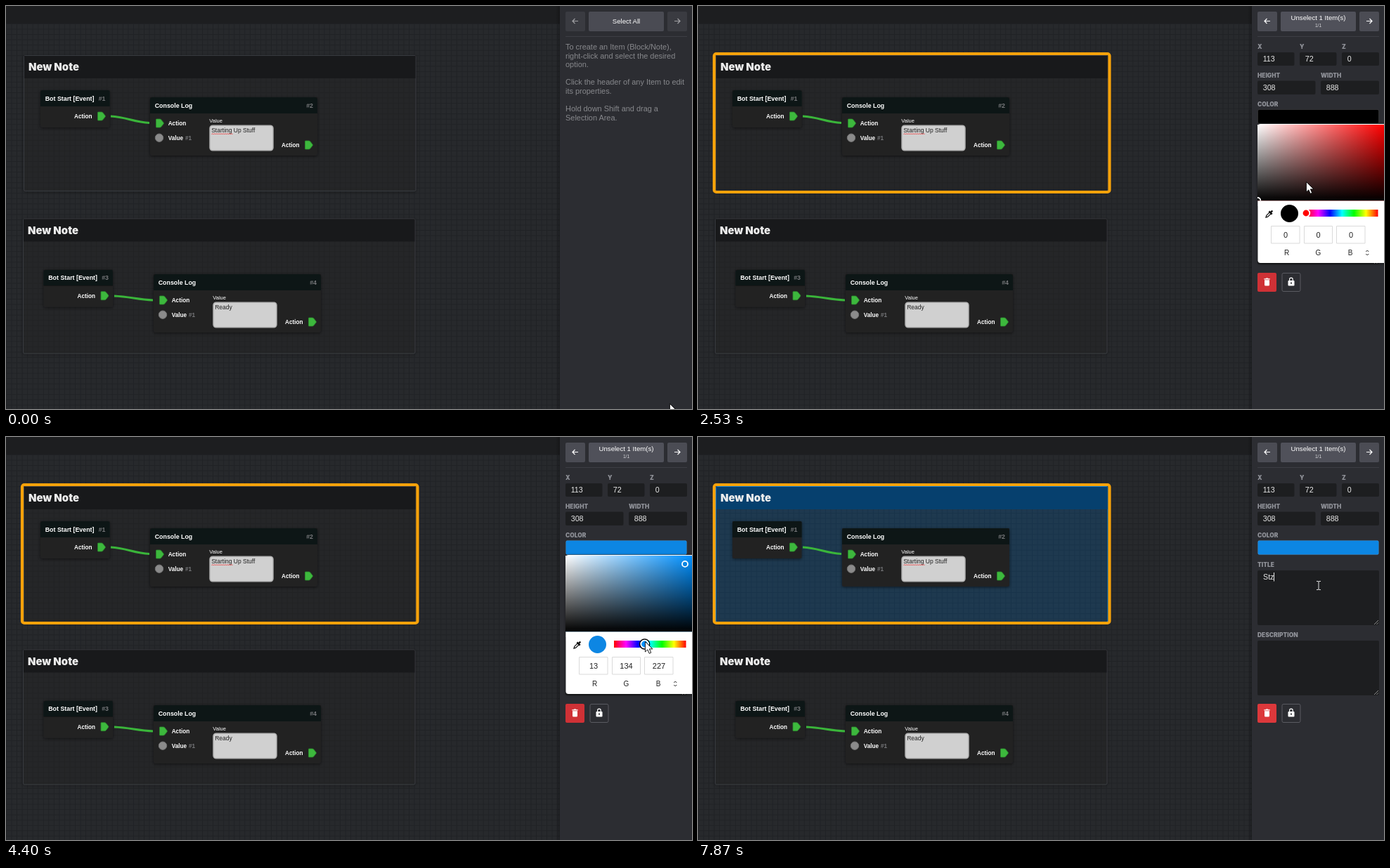
Write an HTML page that moves like this. It is 976 px wide and 574 px high and loops after 8 s.

```html
<!DOCTYPE html>
<html lang="en">
<head>
<meta charset="utf-8">
<title>Node editor</title>
<style>
  html, body { margin: 0; width: 100%; height: 100%; overflow: hidden; background: #26282b; }
  svg { display: block; width: 976px; height: 574px; }
  text { font-family: "Liberation Sans", Arial, sans-serif; fill: #fff; white-space: pre; }
  .head { font: 900 14.9px Inter, sans-serif; fill: #ececec; }
  .label { font: 900 8.4px Inter, sans-serif; fill: #8f9198; }
  .name { font-size: 8.85px; font-weight: bold; }
  .port { font-size: 8.2px; font-weight: bold; }
  .dim { fill: #77787b; }
  .tiny { font-size: 7.5px; }
  .value { font-size: 8.5px; fill: #222; }
  .button { font-size: 9.6px; text-anchor: middle; }
  .help text { font-size: 10.95px; fill: #87888c; }
  .input { font-size: 10.7px; fill: #e8e8e8; }
  .rgb text { font-size: 11px; fill: #222; text-anchor: middle; }
  .end { text-anchor: end; }
  .field { fill: #1d1e20; }
  .icon { fill: none; stroke: #fff; stroke-width: 1.2; }
</style>
</head>
<body>
<svg viewBox="0 0 976 574">
  <defs>
    <pattern id="grid" width="7.54" height="7.54" patternUnits="userSpaceOnUse" y="25">
      <path d="M0 .5H7.54M.5 0V7.54" stroke="#202225" fill="none"/>
    </pattern>
    <linearGradient id="toWhite"><stop stop-color="#fff"/><stop offset="1" stop-color="#fff" stop-opacity="0"/></linearGradient>
    <linearGradient id="toBlack" x2="0" y2="1"><stop stop-opacity="0"/><stop offset="1"/></linearGradient>
    <linearGradient id="edge"><stop stop-opacity="0"/><stop offset="1" stop-opacity=".25"/></linearGradient>
    <linearGradient id="hues">
      <stop stop-color="#f00"/><stop offset=".167" stop-color="#f0f"/><stop offset=".333" stop-color="#00f"/>
      <stop offset=".5" stop-color="#0ff"/><stop offset=".667" stop-color="#0f0"/>
      <stop offset=".833" stop-color="#ff0"/><stop offset="1" stop-color="#f00"/>
    </linearGradient>
    <filter id="shadow" x="-20%" y="-20%" width="140%" height="150%">
      <feDropShadow dx="0" dy="1" stdDeviation="2" flood-opacity=".55"/>
    </filter>
    <clipPath id="shadeClip"><rect x="796" y="169" width="180" height="108.5"/></clipPath>
    <path id="plug" d="M.5-5.2Q.5-6 1.3-6H5.6Q7-6 8-4.8L11-1Q11.7 0 11 1L8 4.8Q7 6 5.6 6H1.3Q.5 6 .5 5.2Z" fill="#3db83d" stroke="#2d8a2e" stroke-width=".8"/>
    <path id="grip" d="M0 6L6 0M3.4 6L6 3.4" stroke="#8a8a8a" fill="none"/>
    <g id="arrow"><path d="M.4.5V15L3.8 11.9 6.2 17.3 8.7 16.2 6.4 10.9H11Z" fill="#fff" stroke="#000" stroke-width=".9"/></g>
    <path id="move" d="M0-8L3-4.8H1V-1H4.8V-3L8 0 4.8 3V1H1V4.8H3L0 8-3 4.8H-1V1H-4.8V3L-8 0-4.8-3V-1H-1V-4.8H-3Z" fill="#fff" stroke="#000" stroke-width=".7"/>
    <path id="beam" d="M-3-6H-1Q0-6 0-5 0-6 1-6H3M0-5V5M-3 6H-1Q0 6 0 5 0 6 1 6H3" fill="none" stroke="#ddd"/>
  </defs>

  <rect width="976" height="574" fill="#27292c"/>
  <rect width="788" height="574" fill="url(#grid)"/>
  <rect width="788" height="25" fill="#1d1e20"/>
  <g id="canvas"></g>

  <rect x="782" width="6" height="574" fill="url(#edge)"/>
  <rect x="788" width="188" height="574" fill="#2c2d32"/>
  <g id="nav">
    <rect x="796" y="8" width="28" height="28" rx="2"/>
    <rect x="941" y="8" width="28" height="28" rx="2"/>
    <path d="M814 21.5H806M809.5 18L806 21.5 809.5 25M951 21.5H959M955.5 18L959 21.5 955.5 25" fill="none" stroke-width="1.2"/>
  </g>
  <rect id="main" x="829" y="8" width="107" height="28" rx="2"/>
  <path d="M796 43.5H969" stroke="#3d3e44"/>

  <g id="idle" class="help">
    <text class="button" x="882.5" y="25" style="fill:#fff;font-size:9.6px">Select All</text>
    <text x="796" y="62">To create an Item (Block/Note),</text>
    <text x="796" y="74.6">right-click and select the desired</text>
    <text x="796" y="87.2">option.</text>
    <text x="796" y="112.3">Click the header of any Item to edit</text>
    <text x="796" y="124.9">its properties.</text>
    <text x="796" y="150">Hold down Shift and drag a</text>
    <text x="796" y="162.6">Selection Area.</text>
  </g>

  <g id="form">
    <text class="button" x="882.5" y="20.3">Unselect 1 Item(s)</text>
    <text class="button" x="882.5" y="30" style="font-size:6.6px;fill:#d5d5d8">1/1</text>
    <g id="fields"></g>
    <rect id="swatch" x="796.5" y="147.5" width="172" height="20" rx="2" stroke="#fff" stroke-opacity=".13"/>
    <rect id="mark" x="804" y="193" width="47" height="12" fill="#0a74d4"/>
    <text id="title" class="input" x="804" y="203"></text>
    <path id="caret" d="M.5 193V205.500" stroke="#e8e8e8"/>
    <rect id="trash" x="796" y="380" width="27" height="27" rx="2"/>
    <path d="M805.300 389.500H813.700V388.300H811.500L810.800 387.500H808.200L807.500 388.300H805.300ZM806 390.300H813V397.200Q813 398.500 811.700 398.500H807.300Q806 398.500 806 397.200Z" fill="#fff"/>
    <rect x="831" y="380.500" width="26" height="26" rx="2" fill="none" stroke="#5a5b61"/>
    <path d="M841.600 391V389.500A2.300 2.300 0 0 1 846.200 389.500V391" class="icon"/>
    <rect x="839.500" y="391" width="9" height="7.500" rx="1" fill="#fff"/>
    <circle cx="844" cy="394.700" r="1.100" fill="#2c2d32"/>
  </g>

  <g id="picker" class="rgb">
    <rect x="796.500" y="168" width="190" height="198" rx="4" fill="#fff" filter="url(#shadow)"/>
    <g clip-path="url(#shadeClip)">
      <rect id="shade" x="796" y="169" width="180.300" height="108.500"/>
      <rect x="796" y="169" width="180.300" height="108.500" fill="url(#toWhite)"/>
      <rect x="796" y="169" width="180.300" height="108.500" fill="url(#toBlack)"/>
      <g id="shadeKnob" fill="none"><circle r="5.500" stroke="#000" stroke-width="2"/><circle r="4" stroke="#fff" stroke-width="1.800"/></g>
    </g>
    <path d="M808 301L808.800 298.300 813.600 293.500 815.500 295.400 810.700 300.200Z" fill="none" stroke="#111" stroke-width="1.200"/>
    <path d="M812.400 292.300L816.700 296.600M814 294.800L817.300 291.500" stroke="#111" stroke-width="2.400"/>
    <circle id="dot" cx="841.500" cy="295.500" r="12.500"/>
    <rect x="865" y="290" width="102.500" height="10" fill="url(#hues)"/>
    <g id="hueKnob"><circle r="7" stroke="#000" stroke-width="1.600" fill="none"/><circle id="hueFill" r="5.300" stroke="#fff" stroke-width="1.800"/></g>
    <path d="M815.500 313.500h40.500v24.500h-40.500ZM862.500 313.500H902.500V338H862.500ZM908.500 313.500H949V338H908.500Z" fill="none" stroke="#dadada"/>
    <text id="r" x="836" y="330"></text><text id="g" x="882.500" y="330"></text><text id="b" x="929" y="330"></text>
    <text x="837.500" y="355" style="font-size:10px">R</text><text x="882.500" y="355" style="font-size:10px">G</text><text x="928" y="355" style="font-size:10px">B</text>
    <path d="M950.300 350L952.300 348 954.300 350M950.300 353L952.300 355 954.300 353" fill="none" stroke="#222"/>
  </g>
  <use id="cursor"/>
</svg>

<script>
const $ = id => document.getElementById(id);
const show = (id, on) => $(id).style.display = on ? "" : "none";
const at = (id, x, y) => $(id).setAttribute("transform", `translate(${x} ${y})`);
const fill = (id, color) => $(id).setAttribute("fill", color);

// Static scene
const note = (x, y, w, h, id) => `<g transform="translate(${x} ${y})">
  <rect id="${id}Body" x=".5" y=".5" width="${w}" height="${h}" rx="2" fill="#2a2c2f" fill-opacity=".35" stroke="#393b3f" filter="url(#shadow)"/>
  <rect id="${id}Head" x="1" y="1" width="${w - 1}" height="32" fill="#18191b"/>
  <text class="head" x="7" y="22">New Note</text></g>`;

const box = (w, h, name, id) => `<g filter="url(#shadow)"><rect width="${w}" height="${h}" rx="2" fill="#212224"/>
  <path d="M0 23V2Q0 0 2 0H${w - 2}Q${w} 0 ${w} 2V23Z" fill="#111214"/></g>
  <text class="name" x="6.700" y="14.700">${name}</text>
  <text class="name dim end" x="${w - 6}" y="14.700" font-weight="400">#${id}</text>`;

const plug = (x, y) => `<use href="#plug" x="${x}" y="${y}"/>`;

const startBlock = (x, y, id) => `<g transform="translate(${x} ${y})">${box(98.5, 53, "Bot Start [Event]", id)}
  <text class="port end" x="73.500" y="40">Action</text>${plug(81, 37)}</g>`;

const logBlock = (x, y, id, value, extra = "") => `<g transform="translate(${x} ${y})">${box(238, 83, "Console Log", id)}
  ${plug(8, 37)}<text class="port" x="25.700" y="40">Action</text>
  <circle cx="13" cy="57.700" r="5.700" fill="#8b8b8b" stroke="#747474"/>
  <text class="port" x="25.700" y="60.800">Value</text><text class="port dim" x="50" y="60.800">#1</text>
  <text class="tiny" x="84.300" y="35.700">Value</text>
  <rect x="85" y="40.200" width="90" height="35.600" rx="4" fill="#d0d0d0" stroke="#b0b0b0" stroke-width="1.500"/>
  <text class="value" x="87.200" y="50.300">${value}</text>${extra}
  <text class="port end" x="212.500" y="71.400">Action</text>${plug(220, 68)}</g>`;

const wire = (x, y, dy) => `<path d="M${x} ${y}c22 1 33 ${dy - 1} 55 ${dy}" fill="none" stroke="#3ab53a" stroke-width="3"/>`;
const squiggle = `<path d="M87.500 53${"l1.500-1.500 1.500 1.500".repeat(10)}" fill="none" stroke="#e33" stroke-width=".8"/>`;

$("canvas").innerHTML =
  note(25, 70, 557.5, 193, "first") +
  `<rect id="outline" x="23" y="68" width="562.500" height="197" rx="3" fill="none" stroke="#f7a20a" stroke-width="4.200"/>` +
  note(24, 302.5, 557.5, 192, "second") +
  startBlock(49, 120, 1) + logBlock(205, 130, 2, "Starting Up Stuff", squiggle) + wire(149, 157, 9.500) +
  startBlock(53.5, 375.7, 3) + logBlock(210, 382, 4, "Ready") + wire(154, 413, 6);

const field = (label, x, y, w, h, value = "") => `<text class="label" x="${x}" y="${y - 5}">${label}</text>
  <rect class="field" x="${x}" y="${y}" width="${w}" height="${h}" rx="2"/>
  <text class="input" x="${x + 7.7}" y="${y + 13}">${value}</text>
  ${h > 50 ? `<use href="#grip" x="${x + w - 7}" y="${y + h - 7}"/>` : ""}`;

$("fields").innerHTML =
  field("X", 796, 66, 52.5, 19, "113") + field("Y", 856, 66, 52.5, 19, "72") + field("Z", 916, 66, 53, 19, "0") +
  field("HEIGHT", 796, 106.5, 82.5, 19.5, "308") + field("WIDTH", 886, 106.5, 83, 19.5, "888") +
  field("COLOR", 796, 147.5, 173, 20) + field("TITLE", 796, 190, 173, 78) + field("DESCRIPTION", 796, 290, 173, 78);

// Motion: [time, x, y] stops
const pointer = [[0, 944, 566], [530, 481, 87], [800, 481, 87], [1600, 823.5, 129.5], [1670, 823.5, 129.5],
  [1870, 823.5, 160], [2070, 823.5, 160], [2530, 865, 250], [2600, 865, 250], [3070, 946.5, 196],
  [3470, 967, 181], [3870, 868, 293], [4330, 909, 291], [4400, 909, 291], [4730, 889, 431], [5000, 889, 431],
  [5330, 849, 240], [5600, 883, 211.5]];
const shadePath = [[2600, 865, 250], [3070, 942.1, 197.4], [3470, 966, 180.9]];
const huePath = [[3870, 868, 295], [4330, 908.6, 295]];
const typed = [[0, "New Note"], [6000, ""], [6870, "S"], [7070, "St"], [7200, "Stz"], [7600, "St"], [7730, "S"], [7870, "Stz"]];

function along(path, t) {
  const i = path.findIndex(p => p[0] > t);
  if (i < 0) return path[path.length - 1].slice(1);
  if (i === 0) return path[0].slice(1);
  const [a, b] = [path[i - 1], path[i]];
  const k = (t - a[0]) / (b[0] - a[0]), e = k * k * (3 - 2 * k);
  return [a[1] + (b[1] - a[1]) * e, a[2] + (b[2] - a[2]) * e];
}

function hsv(h, s, v) {
  const part = n => {
    const k = (n + h / 60) % 6;
    return Math.round(255 * v * (1 - s * Math.max(0, Math.min(k, 4 - k, 1))));
  };
  return [part(5), part(3), part(1)];
}

function cursorKind(x, y, t) {
  if (x > 25 && x < 583 && y > 70 && y < 104) return "move";
  const overText = x > 796 && x < 969 && (y > 190 && y < 268 || y > 290 && y < 368);
  return t >= 4800 && overText ? "beam" : "arrow";
}

function draw(t) {
  const selected = t >= 800, open = t >= 2070 && t < 4800, blue = t >= 4800;
  const [px, py] = along(pointer, t);
  $("cursor").setAttribute("href", "#" + cursorKind(px, py, t));
  at("cursor", px, py);

  const lit = Math.max(0, Math.min(1, (t - 800) / 200));
  const mix = (a, b) => Math.round(a + (b - a) * lit);
  $("nav").setAttribute("fill", `rgb(${mix(58, 75)},${mix(59, 76)},${mix(65, 84)})`);
  $("nav").setAttribute("stroke", "none");
  $("nav").lastElementChild.setAttribute("stroke", `rgb(${mix(160, 255)},${mix(160, 255)},${mix(163, 255)})`);
  fill("main", selected ? "#50515a" : "#4a4b53");
  show("idle", !selected);
  show("form", selected);
  show("outline", selected);

  // Colour choice
  const [sx, sy] = t < 2670 ? [796.3, 277] : along(shadePath, t);
  const hx = t < 3870 ? 865 : along(huePath, t)[0];
  const hue = 360 * (1 - (hx - 865) / 102) % 360;
  const rgb = hsv(hue, (sx - 796.3) / 180, 1 - (sy - 169) / 108);
  const color = `rgb(${rgb})`, pure = `rgb(${hsv(hue, 1, 1)})`;
  ["swatch", "dot"].forEach(id => fill(id, color));
  ["shade", "hueFill"].forEach(id => fill(id, pure));
  ["r", "g", "b"].forEach((id, i) => $(id).textContent = rgb[i]);
  at("shadeKnob", sx, sy);
  at("hueKnob", hx, 295);
  $("shadeKnob").firstElementChild.style.opacity = t >= 2670 && t < 3870 ? 1 : 0;
  $("hueKnob").firstElementChild.style.opacity = t >= 3870 ? 1 : 0;
  show("picker", open);
  fill("trash", open ? "#cf3136" : "#dc383b");

  fill("firstHead", blue ? "#06406e" : "#18191b");
  fill("firstBody", blue ? "#0d86e3" : "#2a2c2f");
  $("firstBody").setAttribute("fill-opacity", blue ? .16 : .35);
  $("firstBody").setAttribute("stroke", blue ? "#0b7bd2" : "#393b3f");

  // Title typing
  const title = typed.filter(s => s[0] <= t).pop()[1];
  $("title").textContent = title;
  show("mark", t >= 5800 && t < 6000);
  show("caret", t >= 5600 && t < 5800 || t >= 6000 && t < 6530 || t >= 6870);
  at("caret", Math.round(803.7 + (selected && title ? $("title").getComputedTextLength() : 0)), 0);
}

function frame(now) {
  const step = Math.floor((now % 8000 + 5) * 15 / 1000) % 120;
  draw(Math.round(step * 20 / 3) * 10);
  requestAnimationFrame(frame);
}
draw(0);
requestAnimationFrame(frame);
</script>
</body>
</html>
```
